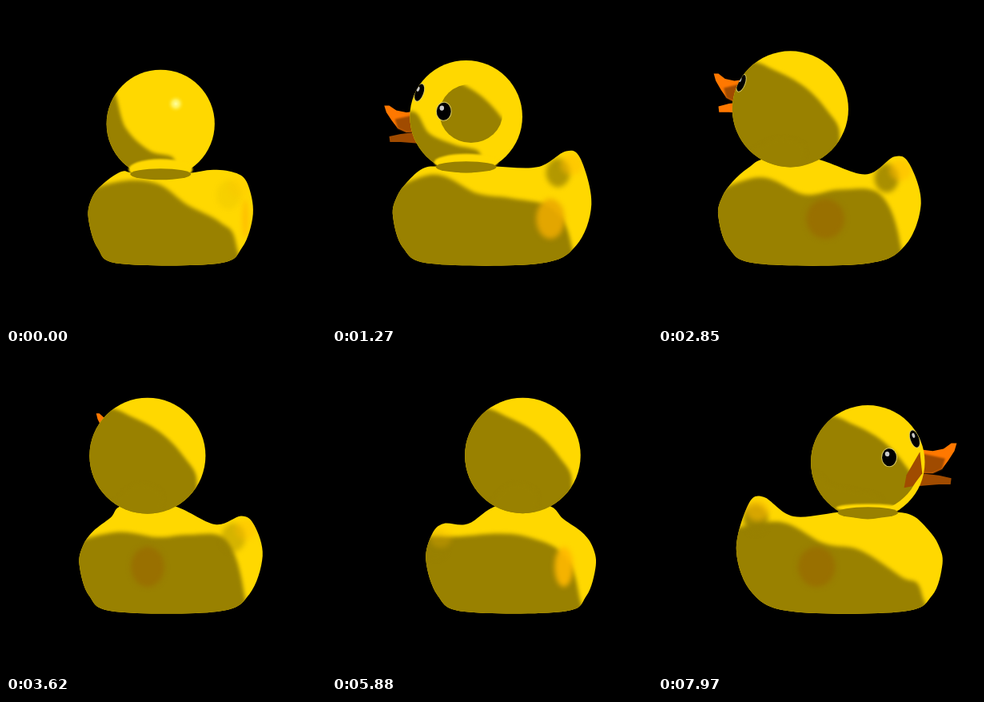
An HTML page with a canvas for the animation above (8000 ms loop, 400 by 400 pixels).

```html
<!DOCTYPE html>
<html lang="en">
<head>
<meta charset="utf-8">
<title>Rubber duck turntable</title>
<style>
  html, body { margin: 0; width: 100%; height: 100%; overflow: hidden; background: #000; }
  canvas { display: block; width: 100vmin; height: 100vmin; }
</style>
</head>
<body>
<canvas id="stage" width="400" height="400"></canvas>
<script>
const ctx = document.getElementById('stage').getContext('2d');
const LOOP = 8000, RAD = Math.PI / 180;
const LIT = '#ffd800', SHADE = '#998100', ORANGE = '#ff7800', RUST = '#a04b00';

// Body outline from breast round the bottom to tail: x in half widths, y in pixels.
const SIDE_VIEW = [[-.72, 202], [-.86, 219], [-.96, 238], [-1, 262], [-.9, 302], [-.61, 322],
  [.44, 322], [.84, 299], [1, 245], [.88, 189], [.73, 180], [.44, 206]];
const HALF_FRONT = [[-.55, 209], [-.83, 226], [-.96, 242], [-1, 266], [-.88, 303], [-.62, 322]];
const FRONT_VIEW = [...HALF_FRONT, ...HALF_FRONT.map(([x, y]) => [-x, y]).reverse()];

// Bill seen from the side, measured from the middle of the head.
const UPPER_BILL = [[-115, -35], [-108, -35], [-98, -27], [-84, -24], [-60, -27], [-60, 7], [-84, 8], [-96, 2], [-104, -10], [-112, -24]];
const LOWER_BILL = [[-108, 15], [-92, 11], [-60, 7], [-60, 27], [-92, 24], [-107, 24]];
const BILL_SHADE = [[-100, -13], [-72, -20], [-60, 7], [-84, 8], [-96, 2]];

const clamp = x => Math.min(Math.max(x, 0), 1);
const mix = (a, b, k) => a + (b - a) * k;

// Everything that depends on the turn: s is 1 facing left, d is 1 facing the viewer.
function turn(t) {
  const even = 18 + t / 30;
  const angle = even + 5 * Math.cos(even * RAD);
  const s = Math.sin(angle * RAD), d = Math.cos(angle * RAD);
  return {
    t, angle, s, d,
    side: Math.abs(s) ** 1.3,
    head: { x: 213 - 51 * s, y: 132 + 11 * d + 6 * d * d, r: 72 - 2.5 * d - 2.5 * d * d },
    body: { x: 214 - 14 * s - 3 * d, half: 98 + 33 * s * s }
  };
}

function polygon(points) {
  ctx.beginPath();
  points.forEach(p => ctx.lineTo(...p));
  ctx.closePath();
}

// Closed Catmull-Rom curve.
function curve(points) {
  const n = points.length, at = i => points[(i + n) % n];
  const handle = (i, sign) => at(i).map((c, k) => c + sign * (at(i + 1)[k] - at(i - 1)[k]) / 6);
  ctx.beginPath();
  ctx.moveTo(...points[0]);
  for (let i = 0; i < n; i++) ctx.bezierCurveTo(...handle(i, 1), ...handle(i + 1, -1), ...at(i + 1));
}

function oval(x, y, rx, ry, tilt = 0) {
  ctx.beginPath();
  ctx.ellipse(x, y, Math.max(rx, 0), Math.max(ry, 0), tilt, 0, 7);
}

function fill(color, blur = 0, alpha = 1) {
  ctx.filter = blur ? `blur(${blur}px)` : 'none';
  ctx.globalAlpha = clamp(alpha);
  ctx.fillStyle = color;
  ctx.fill();
  ctx.filter = 'none';
  ctx.globalAlpha = 1;
}

function inside(draw) {
  ctx.save();
  ctx.clip();
  draw();
  ctx.restore();
}

function drawBill({ s, d, head }) {
  const reach = s * (1 + .3 * Math.min(d, 0)), flatten = 1 - Math.abs(d) / 2;
  const place = points => points.map(([x, y]) => [head.x + x * reach, 130 + y * flatten + 47 * d]);
  polygon(place(LOWER_BILL));
  fill(d > .2 ? RUST : ORANGE);
  polygon(place(UPPER_BILL));
  fill(ORANGE);
  polygon(place(BILL_SHADE));
  fill(RUST, 1);
}

function bodyOutline({ s, d, side, body, head }) {
  const facing = s < 0 ? -1 : 1;
  const points = SIDE_VIEW.map(([x, y], i) => {
    const lift = i > 8 ? 13 * d * side : 0;
    const [frontX, frontY] = FRONT_VIEW[i];
    return [body.x + facing * body.half * mix(frontX, x, side), mix(frontY, y, side) - lift];
  });
  for (const end of [30, -30]) points.push([head.x + facing * end, head.y + 62]);
  return points;
}

function drawWing(x, angle) {
  const width = Math.sin(angle * RAD), lit = clamp(1.2 * Math.cos(angle * RAD));
  if (width <= 0) return;
  oval(x, 266, 24 * width, 25);
  fill(`rgb(${mix(153, 255, lit)}, ${mix(110, 184, lit)}, 0)`, 3, .9);
}

function drawBody(v) {
  const { s, d, side, angle, body } = v;
  const outline = bodyOutline(v);
  const tail = outline[10];
  curve(outline);
  fill(LIT);
  inside(() => {
    const edge = [
      [-1.2, 235 + 8 * s],
      [-.6, 227 - 6 * d - 17 * s * s],
      [-.15, 220 + 18 * s * s],
      [.2, 238 + 13 * d - 4 * s],
      [.6, 258 + 20 * d - 16 * s],
      [.8, 300],
      [.85, 420], [-1.5, 420], [-1.5, 260]
    ];
    curve(edge.map(([x, y]) => [body.x + x * body.half, y]));
    fill(SHADE, 2.5);
    oval(tail[0] - 10, tail[1] + 27, 15, 18);
    fill(SHADE, 3, side * side);
    oval(tail[0] + 8 * s, tail[1] + 17, 14, 13);
    fill('#ffbc00', 3, .6 * side);
    for (const offset of [15, 181]) {
      drawWing(218 + 82 * Math.cos((angle - offset) * RAD), angle - offset);
    }
  });
}

// The eyes sit 22 degrees to either side of the bill.
function drawEye({ s, angle, head }, offset) {
  const a = (angle + 6 - 22.6 * s + offset) * RAD;
  const depth = Math.cos(a), across = -.88 * Math.sin(a);
  if (depth < .1) return;
  const x = head.x + head.r * across, y = head.y - 44 + 42 * depth;
  const rx = 10.5 * Math.sqrt(depth), ry = 12, tilt = -.6 * across ** 3;
  oval(x, y, rx, ry, tilt);
  fill('#d8c860');
  oval(x, y, rx - 1, ry - 1, tilt);
  fill('#000');
  oval(x - rx * .25, y - ry * .35, rx * .28, ry * .26, tilt);
  fill('#c8c8c8');
}

function drawHead(v) {
  const { t, s, d, head } = v;
  const place = points => points.map(([x, y]) => [head.x + x * head.r, head.y + y * head.r]);
  oval(head.x, head.y, head.r, head.r);
  fill(LIT);
  inside(() => {
    // The front light eats into the shade from outside an oval as the face turns to us.
    const shadeSize = head.r * (1.6 - 2.3 * d);
    oval(head.x + 7 * s, head.y - 4, shadeSize * 1.02, shadeSize * .95);
    inside(() => {
      curve(place([[-.75, -.8], [-.25, -.66], [.25, -.38], [.63, .02], [.85, .45], [.6, 1.2], [-1.2, 1.2], [-1.4, -.3]]));
      fill(SHADE, 2);
    });
    curve(place([[-.95, .5 - 1.3 * d], [-.65, .3 - .5 * (d - .46)], [-.2, .5], [.25, .66], [0, 1.2], [-1.2, 1.2], [-1.5, .2]]));
    fill(SHADE, 2);
    if (t > 400) [-22, 22].forEach(offset => drawEye(v, offset));
    if (s < 0 && d > 0) {
      const corner = [[45, 32], [48, 16], [65, -13], [68, 14], [56, 30]];
      polygon(corner.map(([x, y]) => [head.x + 70 - (70 - x) * d / .26, head.y + y]));
      fill(RUST);
    }
  });
}

function drawNeck({ d, head }) {
  oval(head.x, head.y + 57, 40, 13 * clamp(2.2 * d - .2));
  fill(LIT, 1);
  oval(head.x, head.y + 63, 38, 7 * clamp(1 + 3 * d));
  fill(SHADE, .7);
}

function drawShine({ d, head }) {
  const alpha = 6 * (d - .75);
  if (alpha <= 0) return;
  const x = head.x + 19, y = head.y - 25;
  const glow = ctx.createRadialGradient(x, y, 0, x, y, 11);
  glow.addColorStop(0, '#ffffa0');
  glow.addColorStop(.45, '#fff050');
  glow.addColorStop(1, 'rgba(255,216,0,0)');
  oval(x, y, 11, 11);
  fill(glow, 0, alpha);
}

function frame(now) {
  const view = turn(now % LOOP);
  ctx.fillStyle = '#000';
  ctx.fillRect(0, 0, 400, 400);
  for (const draw of [drawBill, drawBody, drawHead, drawNeck, drawShine]) draw(view);
  requestAnimationFrame(frame);
}
requestAnimationFrame(frame);
</script>
</body>
</html>
```
